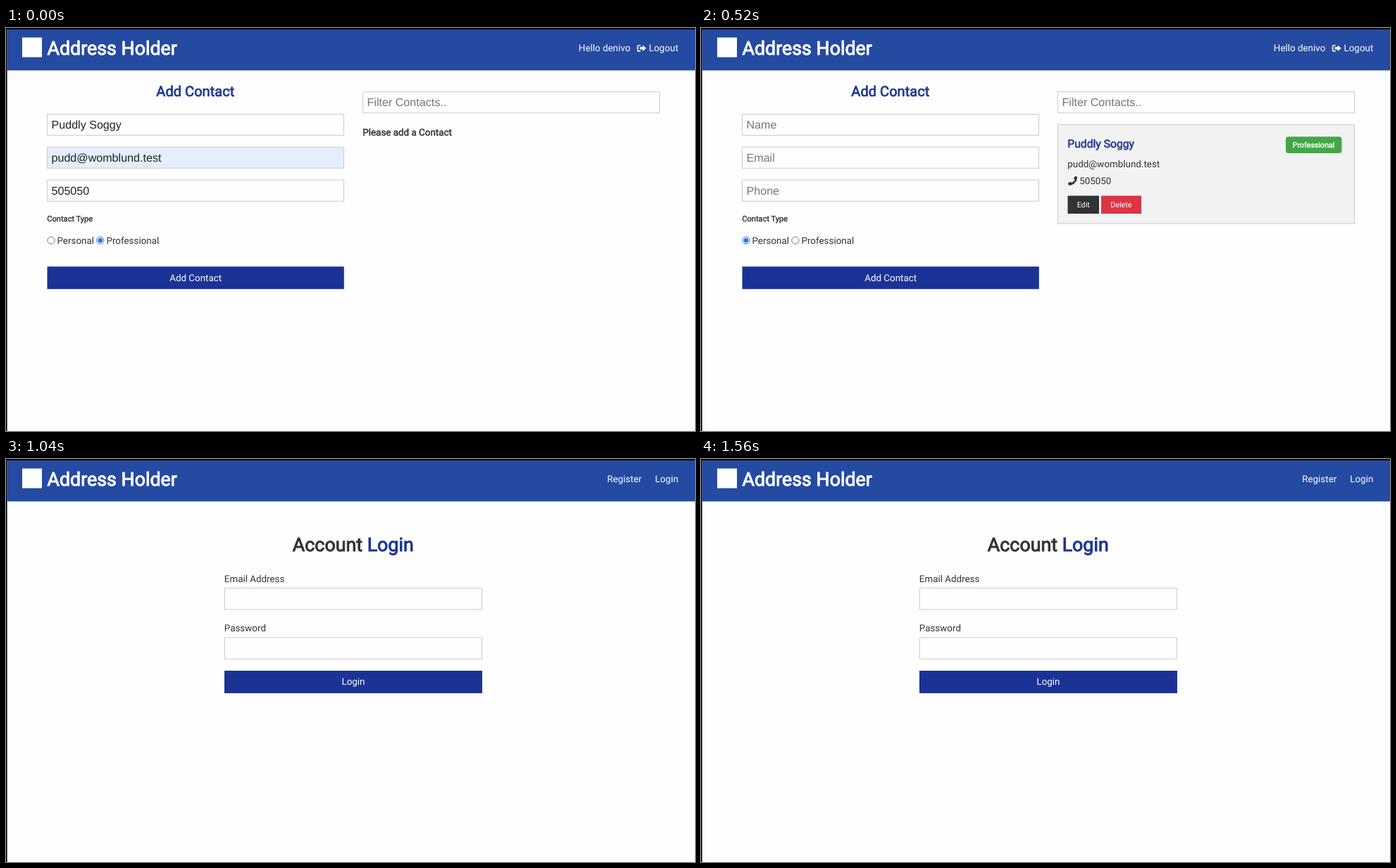
Write an HTML page that moves like this. It is 978 by 573 pixels and loops after 1.82 s.

```html
<!DOCTYPE html>
<html lang="en">
<head>
<meta charset="utf-8">
<title>Address book</title>
<style>
  html, body { margin: 0; width: 100%; height: 100%; overflow: hidden; background: #fefefe; }
  svg { display: block; width: 978px; height: 573px; }
  text { font: 13.4px Roboto, sans-serif; fill: #333; text-rendering: geometricPrecision; white-space: pre; }
  .h1 { font-size: 26.8px; }
  .h2 { font-size: 20.1px; }
  .h3 { font-size: 15.7px; }
  .h5 { font-size: 11.1px; }
  .small { font-size: 10.7px; }
  .bold { stroke: currentColor; stroke-width: .036em; }
  .white { fill: #fff; color: #fff; }
  .blue { fill: #1a3794; color: #1a3794; }
  .dark { fill: #333; color: #333; }
  .input { font: 16.1px "Liberation Sans", Arial, sans-serif; fill: #222; }
  .hint { fill: #757575; }
  .mid { text-anchor: middle; }
  .end { text-anchor: end; }
  .scene { visibility: hidden; }
  .scene.on { visibility: visible; }
</style>
</head>
<body>
<svg id="stage" viewBox="0 0 978 573"></svg>
<script>
const LOOP = 1820;
const NAVY = '#1b3397', HOVER = '#2f5bab';
const CONTACT = { name: 'Puddly Soggy', email: 'pudd@womblund.test', phone: '505050' };

const rect = (x, y, w, h, fill, extra = '') =>
  `<rect x="${x}" y="${y}" width="${w}" height="${h}" fill="${fill}" ${extra}/>`;
const text = (x, y, str, cls = '') => `<text x="${x}" y="${y}" class="${cls}">${str}</text>`;
const box = (x, y, w, h, fill = '#fefefe') => rect(x, y, w, h, fill, 'stroke="#ccc"');
const button = (x, y, w, label, fill = NAVY) =>
  rect(x, y, w, 32, fill) + text(x + w / 2, y + 20.3, label, 'white mid');

const field = (x, y, value, hint, fill) =>
  box(x, y, 421, 30, fill) + text(x + 6, y + 20.3, value || hint, value ? 'input' : 'input hint');

const radio = (x, on) =>
  `<circle cx="${x}" cy="302" r="5.1" fill="#fff" stroke="${on ? '#2b74e0' : '#767676'}"/>` +
  (on ? `<circle cx="${x}" cy="302" r="3.3" fill="#2b74e0"/>` : '');

const header = () =>
  rect(0, 0, 978, 2, '#000') + rect(0, 0, 1.6, 573, '#000') +
  rect(1.6, 2, 976.4, 58.3, '#244aa2') +
  rect(23, 13.5, 28, 28, '#fff') +
  text(58.5, 38, 'Address Holder', 'h1 bold white');

const userNav = () =>
  text(886.3, 33.4, 'Hello denivo', 'white end') +
  `<g transform="translate(895.7 23.8)">
    <path d="M5 .9H2.4Q.9 .9 .9 2.4V7.6Q.9 9.1 2.4 9.1H5" fill="none" stroke="#fff" stroke-width="1.6"/>
    <path d="M4 3.3H8V.8L13 5 8 9.2V6.7H4z" fill="#fff"/>
  </g>` +
  text(954.3, 33.4, 'Logout', 'white end');

const guestNav = () =>
  text(902.3, 33.4, 'Register', 'white end') + text(954.3, 33.4, 'Login', 'white end');

const card = () =>
  box(506.5, 137.5, 421, 140.5, '#f2f2f2') +
  text(520.3, 169.5, CONTACT.name, 'h3 bold blue') +
  rect(830, 154.5, 79.5, 23.5, '#44a648', 'rx="4"') +
  text(869.7, 170.3, 'Professional', 'small bold white mid') +
  text(520.3, 197.5, CONTACT.email) +
  `<path transform="translate(521 210.7)" class="dark"
    d="M12.6 .6L9.9 0 8 3.2l1.7 1.9A9.5 9.5 0 0 1 5.2 9.6L3.9 8.1 .1 9.3 .6 12.6Q1 13 1.3 13A11.7 11.7 0 0 0 13 1.3z"/>` +
  text(537.2, 222, CONTACT.phone) +
  rect(520.5, 238.5, 44.5, 25.5, '#303234') + text(542.7, 254.8, 'Edit', 'small white mid') +
  rect(568, 238.5, 57, 25.5, '#dc3545') + text(596.3, 254.8, 'Delete', 'small white mid');

function contacts({ filled, hover, listed, pointer }) {
  const c = filled ? CONTACT : {};
  return userNav() +
    text(268.8, 97, 'Add Contact', 'h2 bold blue mid') +
    field(58.5, 122.5, c.name, 'Name') +
    field(58.5, 169.3, c.email, 'Email', filled && '#e5eefd') +
    field(58.5, 216.2, c.phone, 'Phone') +
    text(58.3, 275, 'Contact Type', 'h5 bold dark') +
    radio(64, !filled) + text(72.5, 306.5, 'Personal') +
    radio(133.8, filled) + text(142.5, 306.5, 'Professional') +
    button(58.5, 339.2, 421.3, 'Add Contact', hover ? HOVER : NAVY) +
    field(506.5, 90.7, '', 'Filter Contacts..') +
    (pointer ? '<circle cx="617" cy="262" r="26" fill="#fbf4f8"/>' : '') +
    (listed ? card() : text(506.3, 152.5, 'Please add a Contact', 'bold dark'));
}

function account(action, labels) {
  const rows = labels.map((label, i) =>
    text(309.8, 175 + i * 70.3, label) + box(310.5, 183.7 + i * 70.3, 365, 30.3));
  return guestNav() +
    `<text x="492.8" y="131" class="h1 mid"><tspan class="bold dark">Account </tspan>` +
    `<tspan class="bold blue">${action}</tspan></text>` +
    rows.join('') +
    button(310, 160.4 + labels.length * 70.3, 366, action);
}

const login = account('Login', ['Email Address', 'Password']);
const register = account('Register', ['Name', 'Email Address', 'Password', 'Confirm Password']);

const timeline = [
  [0, contacts({ filled: true })],
  [260, contacts({ hover: true })],
  [520, contacts({ listed: true })],
  [780, contacts({ listed: true, pointer: true })],
  [910, contacts({})],
  [1040, login],
  [1300, register],
  [1560, login],
];

const stage = document.getElementById('stage');
stage.innerHTML = header() + timeline.map(([, art]) => `<g class="scene">${art}</g>`).join('');
const scenes = [...stage.querySelectorAll('.scene')];
const start = performance.now();

function draw(now) {
  const t = Math.max(0, now - start) % LOOP;
  const current = timeline.filter(([at]) => at <= t).length - 1;
  scenes.forEach((scene, i) => scene.classList.toggle('on', i === current));
  requestAnimationFrame(draw);
}
draw(start);
</script>
</body>
</html>
```
